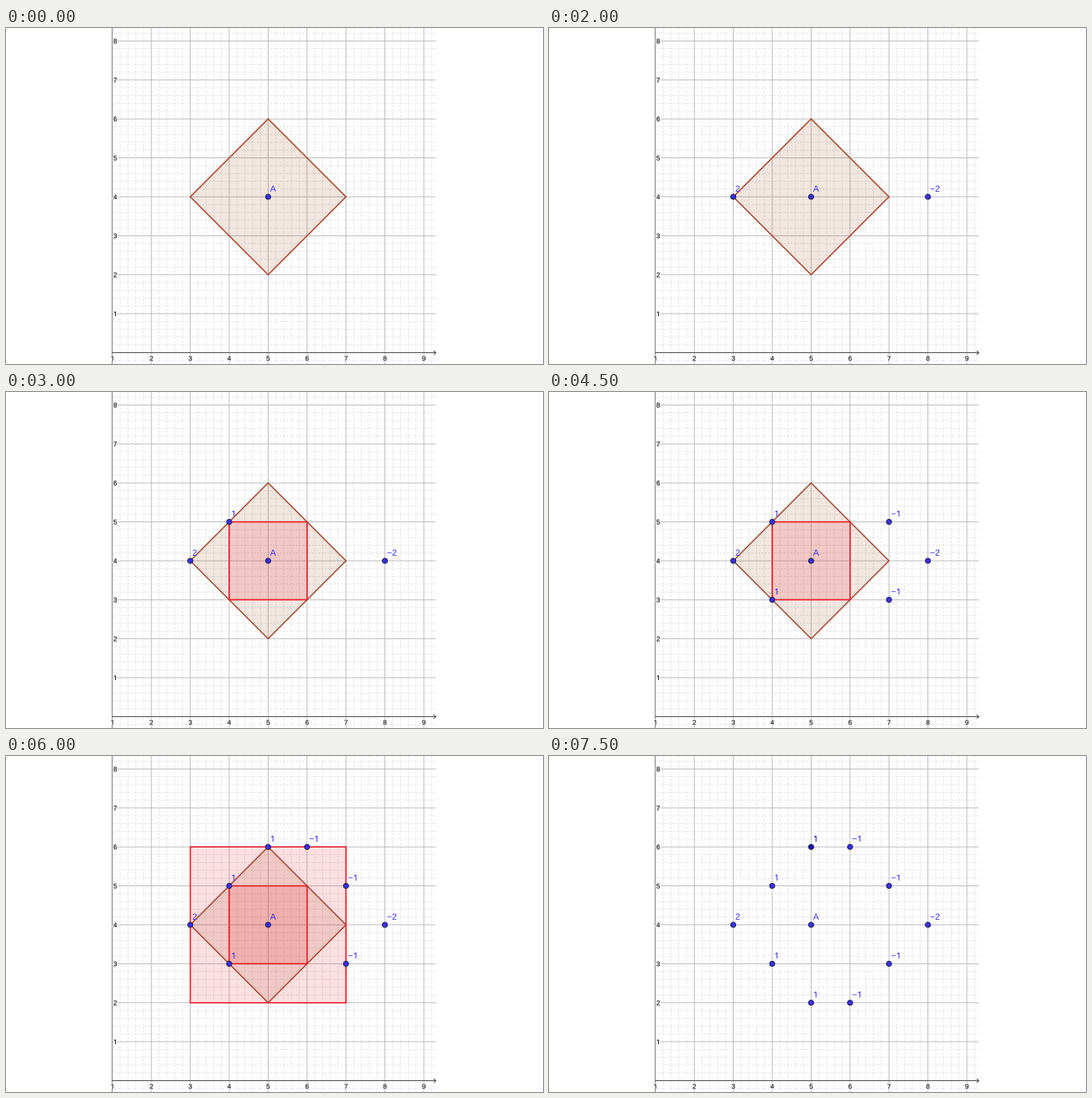
Animation of 640 by 400 pixels, one loop 8000 ms. Source, as a matplotlib script:

```python
import matplotlib.pyplot as plt
from matplotlib import patheffects
from matplotlib.animation import FuncAnimation
from matplotlib.patches import Circle, PathPatch, Polygon
from matplotlib.path import Path
from matplotlib.textpath import TextPath

W, H, DPI = 640, 400, 100
STEPS, STEP_MS = 16, 500
PX = 72 / DPI
UNIT = 46.4
LEFT, RIGHT, BASE = 126.5, 512.4, 386.5

BLUE, DEEP = "#3a2ff8", "#1d10b8"
RED = "#ea1f2d"
MINUS = "\u2212"

plt.rcParams["font.family"] = "Liberation Sans"
plt.rcParams["lines.solid_capstyle"] = "butt"

fig = plt.figure(figsize=(W / DPI, H / DPI), dpi=DPI, facecolor="white")
ax = fig.add_axes([0, 0, 1, 1])
ax.set_xlim(0, W)
ax.set_ylim(H, 0)
ax.axis("off")


def sx(x):
    return LEFT + 0.3 + UNIT * (x - 1)


def sy(y):
    return BASE - 46.38 * y


def line(xs, ys, color, width, **kw):
    return ax.plot(xs, ys, color=color, lw=width * PX, snap=False, **kw)[0]


def label(x, base, text, size, color, z, weight=0.0, halo=0.0):
    """Write text from x along the baseline; the digit 1 is a plain stroke without a foot."""
    parts = []
    plain = text.rstrip("1")
    if plain:
        glyphs = TextPath((0, 0), plain, size=size)
        path = Path(glyphs.vertices * [1, -1] + [x, base], glyphs.codes)
        parts.append(ax.add_patch(PathPatch(path, fc=color, ec=color, lw=weight * PX,
                                            snap=False, zorder=z)))
    if text.endswith("1"):
        start = x + (0.584 * size if plain else 0)
        stem = start + 0.325 * size
        parts.append(line([start + 0.12 * size, stem, stem],
                          [base - 0.53 * size, base - 0.66 * size, base],
                          color, 0.095 * size + weight, zorder=z,
                          solid_joinstyle="miter"))
    if halo:
        for p in parts:
            p.set_path_effects([patheffects.withStroke(linewidth=halo * PX, foreground="white")])
    return parts


def grid_style(i):
    if i % 5 == 0:
        return dict(color="#c0c0c0", width=1, zorder=2)
    return dict(color="#e0e0e0", width=0.8, zorder=1, dashes=(2.8, 2))


def draw_grid():
    for i in range(6, 47):
        line([sx(i / 5)] * 2, [0, H], **grid_style(i))
    for i in range(-1, 42):
        line([LEFT, RIGHT], [sy(i / 5)] * 2, **grid_style(i))
    line([LEFT, LEFT], [0, H], "#858585", 1, zorder=2)
    line([LEFT, RIGHT], [BASE, BASE], "#555555", 1, zorder=3)
    line([RIGHT - 2.8, RIGHT, RIGHT - 2.8], [BASE - 2.4, BASE, BASE + 2.4],
         "#555555", 1, zorder=3)
    axis_text = dict(size=8, color="#202020", z=4, weight=0.2, halo=2.5)
    for n in range(1, 10):
        label(sx(n) - 2.2, 396.1, str(n), **axis_text)
        if n < 9:
            label(127.9, sy(n) + 2.9, str(n), **axis_text)


def polygon(corners, color, alpha, edge, width, z):
    pts = [(sx(x), sy(y)) for x, y in corners]
    fill = Polygon(pts, fc=color, ec="none", alpha=alpha, zorder=z, snap=False)
    rim = Polygon(pts, fill=False, ec=edge, lw=width * PX, zorder=z + 0.5, snap=False)
    return [ax.add_patch(fill), ax.add_patch(rim)]


def square(r):
    return [(5 - r, 4 - r), (5 + r, 4 - r), (5 + r, 4 + r), (5 - r, 4 + r)]


def dot(x, y, fill=BLUE):
    return [ax.add_patch(Circle((sx(x), sy(y)), 3, fc=fill, ec="#1c1c4a", lw=PX,
                                zorder=10, snap=False))]


def tag(x, y, text, color=BLUE):
    return label(sx(x) + 2.4, sy(y) - 6.2, text, 10.4, color, 11)


draw_grid()
timeline = []  # (artists, first step, end step)


def show(artists, start, end=STEPS):
    timeline.append((artists, start, end))


diamond = [(3, 4), (5, 6), (7, 4), (5, 2)]
show(polygon(diamond, "#993300", 0.12, "#aa543c", 1.6, 5), 0, 5)
show(polygon(diamond, "#993300", 0.12, "#9c5138", 1.5, 5), 5, 15)
show(polygon(square(1), RED, 0.15, RED, 1.6, 6), 5, 15)
show(polygon(square(2), RED, 0.14, RED, 1.5, 7), 10, 15)

show(dot(5, 4) + tag(5, 4, "A"), 0)

# The outer pair counts up from one to two
for x, sign, start in [(3, "", 1), (8, MINUS, 2)]:
    show(dot(x, 4), start)
    show(tag(x, 4, sign + "1"), start, start + 2)
    show(tag(x, 4, sign + "2"), start + 2)

for x, y, text, start in [(4, 5, "1", 6), (7, 5, MINUS + "1", 7),
                          (4, 3, "1", 8), (7, 3, MINUS + "1", 9),
                          (6, 6, MINUS + "1", 12),
                          (5, 2, "1", 13), (6, 2, MINUS + "1", 14)]:
    show(dot(x, y) + tag(x, y, text), start)

show(dot(5, 6) + tag(5, 6, "1"), 11, 15)
show(dot(5, 6, DEEP) + tag(5, 6, "1", DEEP), 15)


def update(step):
    for artists, start, end in timeline:
        for a in artists:
            a.set_visible(start <= step < end)
    return []


anim = FuncAnimation(fig, update, frames=STEPS, interval=STEP_MS,
                     init_func=lambda: update(0), repeat=True, repeat_delay=0)
plt.show()
```
